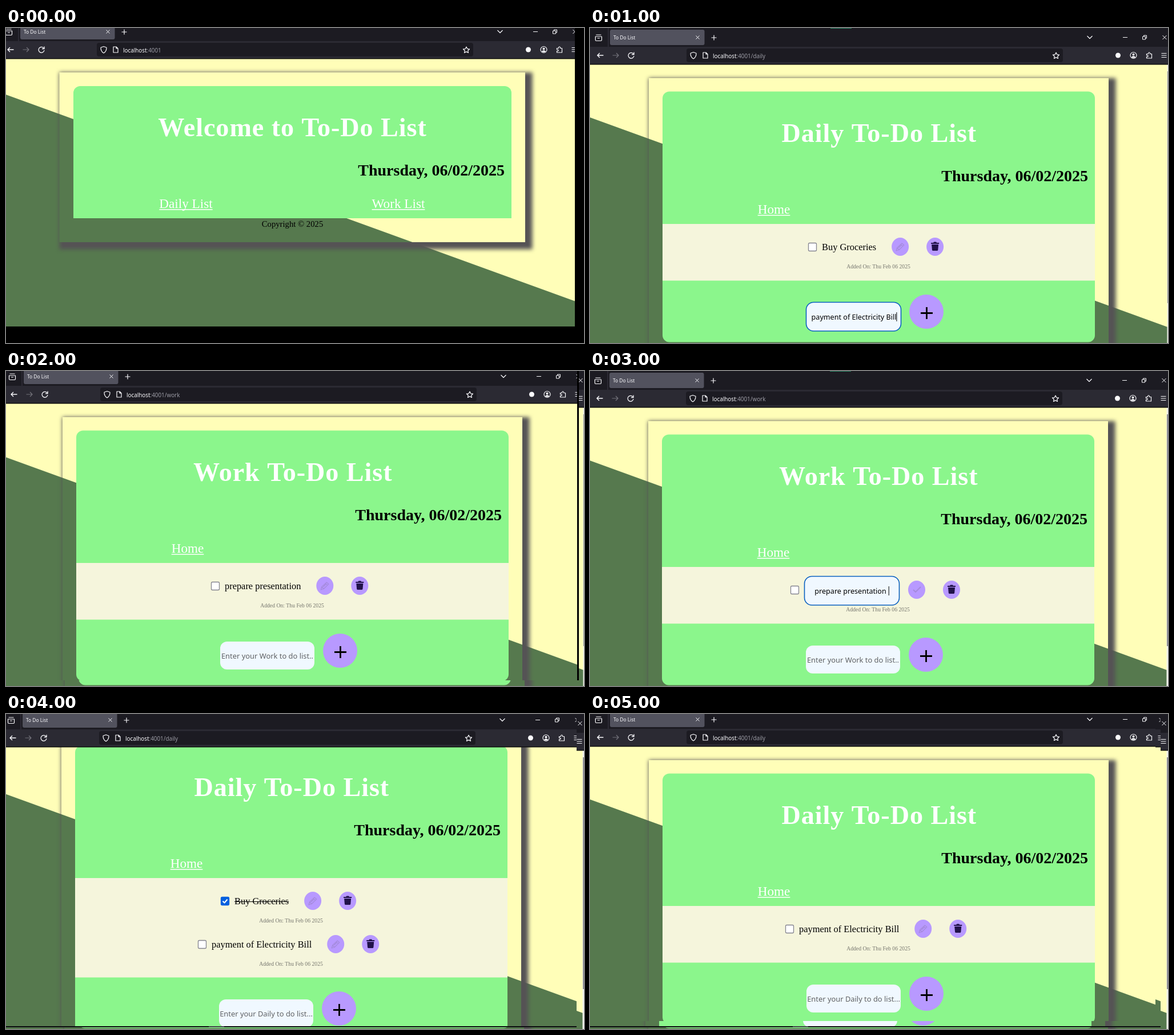
An HTML page with a canvas for the animation above (6 s loop, 1012x553 px).

```html
<!DOCTYPE html>
<html lang="en">
<head>
<meta charset="utf-8">
<title>To Do List</title>
<style>
  html, body { margin: 0; width: 100%; height: 100%; overflow: hidden; background: #000; }
  canvas { display: block; }
</style>
</head>
<body>
<canvas id="stage" width="1012" height="553"></canvas>
<script>
const ctx = document.getElementById("stage").getContext("2d");
const SERIF = '"Liberation Serif", serif';
const SANS = '"Noto Sans", sans-serif';
const PALE = "#fbfbfe", PURPLE = "#b899ff", GREEN = "#8bf68c", FIELD = "#f0f8ff";
const SCENE_MS = 1000;
const EXTRA_ROW = 75;

const GROCERIES = "Buy Groceries", BILL = "payment of Electricity Bill", TALK = "prepare presentation";

// Each view is painted over the previous ones, clipped to its own width and height.
const scenes = [
  { dx: -10, dy: -10, w: 996, h: 524, home: true },
  { w: 1012, h: 553, list: "Daily", rows: [{ label: GROCERIES }], typed: BILL },
  { dx: -4, dy: -7, w: 1003, h: 543, list: "Work", rows: [{ label: TALK }], rightEdge: 1000 },
  { dx: -1, w: 1012, h: 553, list: "Work", rows: [{ label: TALK, editing: true }] },
  { dx: -6, dy: -6, w: 999, h: 550, list: "Daily", scroll: 50,
    rows: [{ label: GROCERIES, done: true }, { label: BILL }], bottomEdge: 548 },
  { dy: -7, w: 990, h: 539, list: "Daily", rows: [{ label: BILL }] },
];

function rect(x, y, w, h, color) {
  ctx.fillStyle = color;
  ctx.fillRect(x, y, w, h);
}

function rounded(x, y, w, h, radius, color, border, lineWidth = 1) {
  ctx.beginPath();
  ctx.roundRect(x, y, w, h, radius);
  ctx.fillStyle = color;
  ctx.fill();
  if (!border) return;
  ctx.strokeStyle = border;
  ctx.lineWidth = lineWidth;
  ctx.stroke();
}

function oval(x, y, rx, ry, color) {
  ctx.beginPath();
  ctx.ellipse(x, y, rx, ry, 0, 0, 7);
  ctx.fillStyle = color;
  ctx.fill();
}

function text(string, x, y, font, color, align = "left") {
  ctx.font = font;
  ctx.fillStyle = color;
  ctx.textAlign = align;
  ctx.fillText(string, x, y);
  return ctx.measureText(string).width;
}

function icon(path, x, y, color = PALE, lineWidth = 1.2, filled = false) {
  ctx.save();
  ctx.translate(x, y);
  ctx.strokeStyle = ctx.fillStyle = color;
  ctx.lineWidth = lineWidth;
  ctx.lineJoin = "round";
  const shape = new Path2D(path);
  filled ? ctx.fill(shape) : ctx.stroke(shape);
  ctx.restore();
}

function link(label, centre) {
  const width = text(label, centre, 326, "23.2px " + SERIF, "#fff", "center");
  rect(centre - width / 2, 328, width, 1.5, "#fff");
}

function background(split) {
  rect(0, 0, 1040, 720, "#fffeb8");
  ctx.beginPath();
  ctx.moveTo(0, split);
  ctx.lineTo(1040, split + 1040 * Math.tan(Math.PI / 9));
  ctx.lineTo(1040, 720);
  ctx.lineTo(0, 720);
  ctx.fillStyle = "#56794e";
  ctx.fill();
}

function cardShadow(x, y, w, h) {
  ctx.save();
  ctx.beginPath();
  ctx.rect(-50, -50, 1150, 850);
  ctx.rect(x, y, w, h);
  ctx.clip("evenodd");
  ctx.filter = "blur(3.5px)";
  rect(x, y, w + 12.5, h + 12.5, "#555355");
  ctx.restore();
}

function header(title, centre, right) {
  ctx.letterSpacing = "0.93px";
  text(title, centre, 200, "bold 46.2px " + SERIF, "#fff", "center");
  ctx.letterSpacing = "0px";
  text("Thursday, 06/02/2025", right - 12, 269, "bold 28px " + SERIF, "#000", "right");
}

function checkbox(x, y, checked) {
  rounded(x + .5, y - 6.5, 14, 14, 2, checked ? "#0060df" : "#fff", checked ? "#0060df" : "#85858f", 1.3);
  if (checked) icon("M-4 0L-1 3L4 -3", x + 7.5, y + .5, "#fff", 2);
}

function focusedField(x, y, value, textCentre, caretGap) {
  rounded(x + .5, y + .5, 166, 50.5, 13, FIELD, "#0a60c0", 1.6);
  const width = text(value, textCentre, y + 30.5, "12.6px " + SANS, "#000", "center");
  rect(textCentre + width / 2 + caretGap, y + 18, 1, 16, "#000");
}

function itemRow({ label, done, editing }, y) {
  const font = "16.4px " + SERIF;
  ctx.font = font;
  const labelWidth = editing ? 167 : ctx.measureText(label).width;
  const gap = editing ? 30 : 42;
  const x = Math.floor(501 - (labelWidth + gap + 100) / 2);
  const labelX = x + 24, editX = labelX + labelWidth + gap, trashX = editX + 61;

  checkbox(x, y, done);
  if (editing) focusedField(labelX, y - 24, label, 457, 4);
  else text(label, labelX, y + 6, font, "#000");
  if (done) rect(labelX, y + 1, labelWidth, 1, "#000");

  oval(editX, y, 15, 16, PURPLE);
  if (editing) icon("M-6 0L-2 4L7 -5", editX, y, "#a58bdd", 2);
  else icon("M-7 7L-5.5 2L3 -6L6.5 -3L-2 5.5ZM-5.5 2L-2 5.5M1 -4L4.5 -.5M-3 2L2 -3", editX, y, "#a58bdd", 1.3);

  oval(trashX, y, 15, 16, PURPLE);
  icon("M-7 -7H-3L-2 -8.5H2L3 -7H7V-5H-7ZM-6 -4H6L5.2 5.5Q5 7 3.5 7H-3.5Q-5 7 -5.2 5.5Z", trashX, y, "#21124a", 1, true);
  text("Added On: Thu Feb 06 2025", 505, y + 38, "9.7px " + SERIF, "#77776f", "center");
}

function homePage() {
  background(123.4);
  cardShadow(103.5, 88, 815.5, 298);
  rounded(128, 112, 767, 232, [12, 12, 0, 0], GREEN);
  header("Welcome to To-Do List", 511.5, 895);
  link("Daily List", 325);
  link("Work List", 697);
  text("Copyright © 2025", 511.5, 358.5, "14.7px " + SERIF, "#000", "center");
}

function listPage({ list, rows, typed }) {
  const extra = (rows.length - 1) * EXTRA_ROW;
  background(157 + extra / 2);
  cardShadow(103, 88, 805, 506 + extra);
  rounded(127, 111.5, 757, 440 + extra, 12, GREEN);
  header(list + " To-Do List", 506.3, 884);
  link("Home", 322);
  rect(127, 344, 757, 99.5 + extra, "#f5f5dc");
  rows.forEach((row, i) => itemRow(row, 384 + i * (EXTRA_ROW + 1)));

  ctx.save();
  ctx.translate(0, extra);
  if (typed) focusedField(378, 481, typed, 462, 0);
  else {
    rounded(379, 482, 165, 49, 12, FIELD);
    const dots = list === "Work" ? ".." : "...";
    text(`Enter your ${list} to do list${dots}`, 461.5, 511.5, "12.9px " + SANS, "#606264", "center");
  }
  oval(589, 498, 30, 30, PURPLE);
  icon("M-10.5 0H10.5M0 -10.5V10.5", 589.5, 500.5, "#000", 2.8);
  ctx.restore();
}

function scrollbar() {
  rect(1010.5, 64, 12, 489, "#f4f4ee");
  rect(1011, 76, 8, 407, "#8f8f98");
}

function browserChrome(path) {
  rect(0, 0, 1040, 33, "#1c1b22");
  rect(0, 33, 1040, 31, "#2b2a33");
  rect(0, 63, 1040, 1.5, "#0c0c0d");
  rect(421, 0, 37, 1, "#2c8a68");
  rect(31.5, 0, 1, 33, "#3a3944");

  icon("M-5.5 -2H5.5V4Q5.5 5.5 4 5.5H-4Q-5.5 5.5 -5.5 4ZM-4.5 -5H4.5M-2 1H2", 15, 17);
  rounded(35, 3, 165.5, 27, 3, "#52525e");
  text("To Do List", 41, 20, "8.4px " + SANS, PALE);
  icon("M-3 -3L3 3M3 -3L-3 3", 188.5, 16.5, PALE, 1);
  icon("M-4.5 0H4.5M0 -4.5V4.5", 217, 17);
  icon("M-4.5 -2L0 2.5L4.5 -2", 875, 16);
  icon("M-4 0H4", 937, 16.5, PALE, 1);
  icon("M-3.5 -1.5H1.5V3.5H-3.5ZM-1.5 -1.5V-3.5H3.5V1.5H1.5", 971, 16.5, PALE, 1);
  icon("M-3.5 -3.5L3.5 3.5M3.5 -3.5L-3.5 3.5", 1006, 16.5, PALE, 1);

  icon("M5.5 0H-5M-1 -4L-5 0L-1 4", 18, 48, PALE, 1.4);
  icon("M-5.5 0H5M1 -4L5 0L1 4", 45, 48, "#73727a", 1.2);
  icon("M4.2 -2.5A5 5 0 1 0 5 1M5 -5.5V-1.5H1", 72, 48, PALE, 1.3);

  rounded(169, 36, 659, 24, 4, "#1c1b22");
  icon("M0 -5.5L5 -3.8Q5.2 3 0 6Q-5.2 3 -5 -3.8Z", 181, 48);
  icon("M-4 -5H1L4 -2V5H-4ZM1 -5V-2H4", 202, 48);
  const host = text("localhost", 215, 52.5, "9.85px " + SANS, PALE);
  text(":4001" + path, 215 + host, 52.5, "9.85px " + SANS, "#9b9ba4");
  icon("M0 -5.5L1.7 -1.9L5.6 -1.5L2.7 1.2L3.5 5L0 3.1L-3.5 5L-2.7 1.2L-5.6 -1.5L-1.7 -1.9Z", 816, 48.5);

  oval(924.5, 48, 4.5, 4.5, PALE);
  icon("M5.5 0A5.5 5.5 0 1 1 -5.5 0A5.5 5.5 0 1 1 5.5 0", 951.5, 48);
  icon("M2 -1.5A2 2 0 1 1 -2 -1.5A2 2 0 1 1 2 -1.5M-3.5 3.5Q-3 1.2 0 1.2Q3 1.2 3.5 3.5Q0 5.5 -3.5 3.5", 951.5, 48, PALE, 1, true);
  icon("M-4.5 -2.5H-1.5V-4Q0 -6.5 1.5 -4V-2.5H4.5V5H-4.5V2.5H-3Q-.5 1.2 -3 0H-4.5Z", 979, 48);
  icon("M-4.5 -3.5H4.5M-4.5 0H4.5M-4.5 3.5H4.5", 1005, 48);
}

function drawScene(scene) {
  const { dx = 0, dy = 0, w, h, scroll = 0, home, list, rightEdge, bottomEdge } = scene;
  ctx.save();
  ctx.beginPath();
  ctx.rect(0, 0, w, h);
  ctx.clip();

  ctx.save();
  ctx.translate(dx, dy);
  ctx.save();
  ctx.translate(0, -scroll);
  home ? homePage() : listPage(scene);
  ctx.restore();
  if (!home) scrollbar();
  browserChrome(home ? "" : "/" + list.toLowerCase());
  ctx.restore();

  if (rightEdge) rect(rightEdge, 0, w - rightEdge, h, "#000");
  if (bottomEdge) {
    rect(0, bottomEdge, w, h - bottomEdge, "#0c0c10");
    rect(355, bottomEdge, 27, h - bottomEdge, "#44444c");
  }
  ctx.restore();
}

let shown = -1;
function tick() {
  const current = Math.floor(performance.now() / SCENE_MS) % scenes.length;
  if (current !== shown) {
    shown = current;
    rect(0, 0, 1012, 553, "#000");
    scenes.slice(0, current + 1).forEach(drawScene);
  }
  requestAnimationFrame(tick);
}
tick();
</script>
</body>
</html>
```
